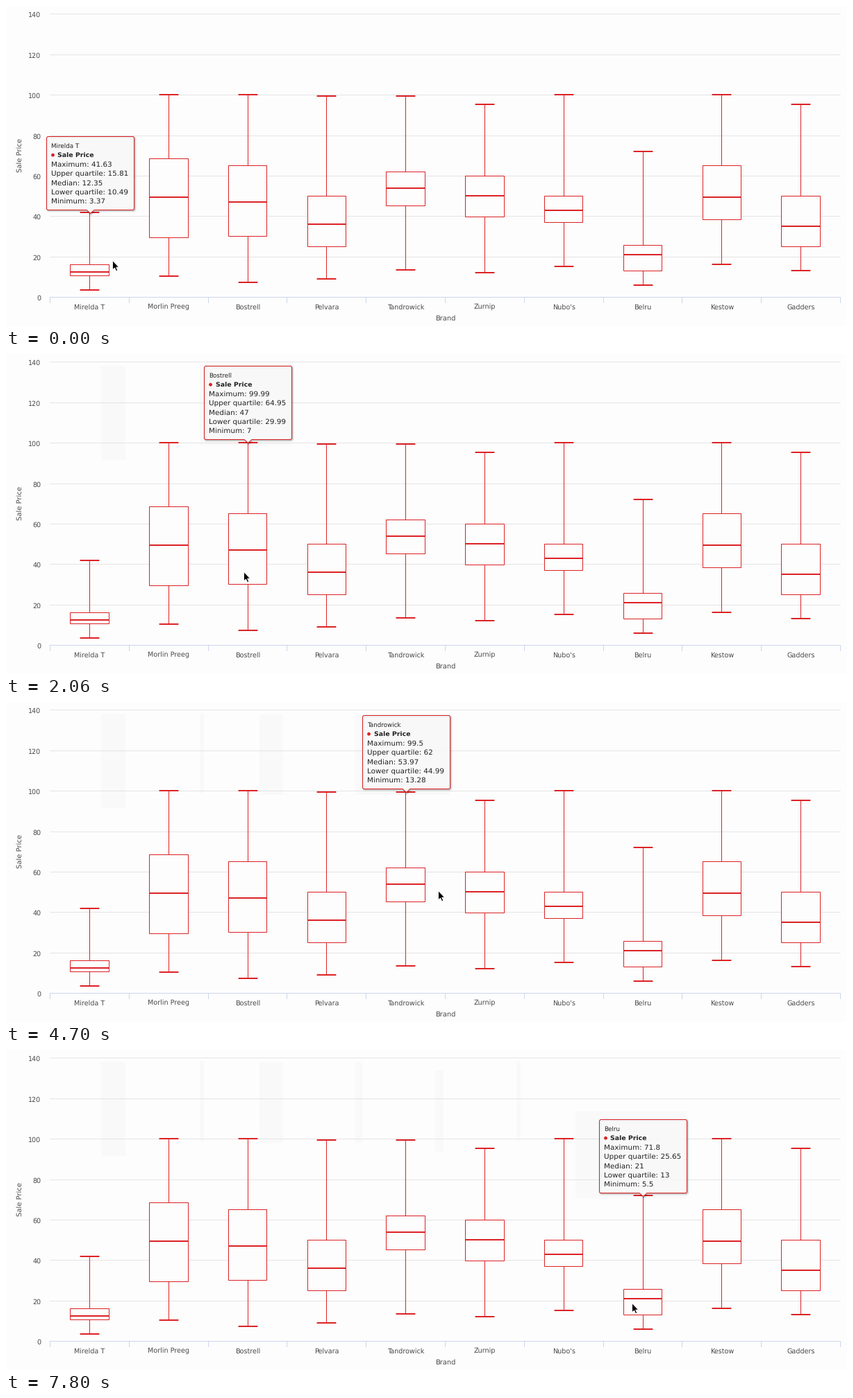
A matplotlib script that plays this animation: 1211x462 px, repeating every 8 s.

```python
import numpy as np
import matplotlib.pyplot as plt
from matplotlib.animation import FuncAnimation
from matplotlib.collections import LineCollection
from matplotlib.patches import Circle, PathPatch, Polygon, Rectangle
from matplotlib.path import Path

plt.rcParams["font.family"] = "DejaVu Sans"
plt.rcParams["text.hinting"] = "none"

W, H, DPI = 1211, 462, 64
PT = 72 / DPI  # points per pixel

BG = "#fdfdfd"
RED = "#dc2225"
GRID = "#e4e4e4"
AXIS = "#ccd6eb"
LABEL = "#4a4a4a"
INK = "#222222"
TRAIL = "#f9f9f9"

LEFT, SLOT = 63.05, 113.8
BASE, UNIT = 420, 408 / 140  # pixel row of price 0, pixels per price unit

# name, then minimum, lower quartile, median, upper quartile, maximum
BRANDS = [
    ("Mirelda T", 3.37, 10.49, 12.35, 15.81, 41.63),
    ("Morlin Preeg", 10, 29.27, 49.5, 68.32, 99.99),
    ("Bostrell", 7, 29.99, 47, 64.95, 99.99),
    ("Pelvara", 8.66, 25, 36, 49.99, 99.5),
    ("Tandrowick", 13.28, 44.99, 53.97, 62, 99.5),
    ("Zurnip", 12, 39.5, 49.99, 60, 95.2),
    ("Nubo's", 14.99, 36.99, 42.99, 49.99, 99.99),
    ("Belru", 5.5, 13, 21, 25.65, 71.8),
    ("Kestow", 16, 38.2, 49.5, 64.95, 99.99),
    ("Gadders", 13, 25, 35, 49.99, 95.2),
]

INTERVAL, FRAMES = 50, 160
STEP, LAST_STEP = 147.1, 53  # the screen refreshes in steps of STEP ms

# Moment (ms) at which the tooltip leaves for each brand
STARTS = [-9999, 346, 1676, 2830, 4073, 4801, 6378, 7402]
# Faint strip left behind by each move: left, top, bottom
TRAILS = [(137, 17, 153), (279, 16, 132), (365, 18, 134), (503, 18, 134),
          (618, 30, 147), (735, 16, 132), (820, 88, 214)]
# Pointer path: step, x, y
POINTER = np.array([
    (0, 153, 367), (2.4, 178, 348), (5, 220, 325), (8, 253, 320),
    (11.3, 291, 317), (14, 342, 314), (17, 372, 320), (19.3, 405, 327),
    (21, 462, 336), (23, 462, 336), (27.7, 519, 306), (32, 622, 272),
    (39, 694, 284), (43.4, 746, 293), (46, 797, 301), (47.5, 813, 309),
    (50.4, 860, 337), (53, 901, 365),
])


def center(i):
    return LEFT + SLOT * (i + 0.5)


def price_y(value):
    return BASE - UNIT * value


def rows(i):
    _, low, q1, med, q3, high = BRANDS[i]
    return [f"Maximum: {high:g}", f"Upper quartile: {q3:g}", f"Median: {med:g}",
            f"Lower quartile: {q1:g}", f"Minimum: {low:g}"]


def tip_width(i):
    longest = max(len(row) for row in rows(i))
    return 126 - 6.6 * (21 - longest)


def tip_rest(i):
    return center(i) + 0.9 - tip_width(i) / 2, price_y(BRANDS[i][5]) - 110.65


def tip_state(ms):
    """Active brand, elapsed easing ticks and tooltip corner."""
    i = max(j for j, start in enumerate(STARTS) if start <= ms)
    ticks = (ms - STARTS[i]) / 31.5
    x, y = tip_rest(i)
    if i and ticks < 12:
        px, py = tip_rest(i - 1)
        x += (px - x) * (2 / 3) ** ticks
        y += (py - y) * 0.5 ** ticks
    return i, ticks, round(x) + 0.5, np.floor(y) + 0.5


def callout(x, y, w, h=106, r=2.5):
    """Rounded box with a small arrow under its middle."""
    x2, y2, m = x + w, y + h, x + w / 2
    M, L, Q = Path.MOVETO, Path.LINETO, Path.CURVE3
    parts = [
        (M, x + r, y), (L, x2 - r, y), (Q, x2, y), (Q, x2, y + r),
        (L, x2, y2 - r), (Q, x2, y2), (Q, x2 - r, y2),
        (L, m + 5.5, y2), (L, m, y2 + 5), (L, m - 5.5, y2),
        (L, x + r, y2), (Q, x, y2), (Q, x, y2 - r),
        (L, x, y + r), (Q, x, y), (Q, x + r, y),
        (Path.CLOSEPOLY, x + r, y),
    ]
    return Path([p[1:] for p in parts], [p[0] for p in parts])


fig = plt.figure(figsize=(W / DPI, H / DPI), dpi=DPI, facecolor=BG)
ax = fig.add_axes([0, 0, 1, 1])
ax.set_xlim(0, W)
ax.set_ylim(H, 0)
ax.axis("off")


def text(x, y, s, px, color, z=3, **kw):
    return ax.text(x, y, s, fontsize=px * PT, color=color, va="baseline",
                   zorder=z, **kw)


def lines(segments, color, px, z):
    # Positions are already on the pixel grid, so snapping stays off.
    strokes = LineCollection(segments, colors=color, capstyle="butt",
                             linewidths=px * PT, zorder=z)
    strokes.set_snap(False)
    ax.add_collection(strokes)


def hline(x1, x2, y):
    return [(x1, y), (x2, y)]


def vline(x, y1, y2):
    return [(x, y1), (x, y2)]


def draw_axes():
    values = range(0, 141, 20)
    ys = [np.floor(420.75 - 409 / 140 * v) + 0.5 for v in values]
    edges = [round(LEFT + SLOT * i) + 0.5 for i in range(11)]
    lines([hline(edges[0], edges[-1], y) for y in ys[1:]], GRID, 1, 1)
    ticks = [vline(x, ys[0], 429) for x in edges]
    lines([hline(edges[0] - 0.5, edges[-1] + 0.5, ys[0])] + ticks, AXIS, 1, 1.5)
    for v, y in zip(values, ys):
        text(50.5, y + 4.2, str(v), 9.5, LABEL, ha="right")
    for i, brand in enumerate(BRANDS):
        text(center(i) + 0.6, 437.4, brand[0], 9.6, LABEL, ha="center")
    text(632.5, 454, "Brand", 9.9, LABEL, ha="center")
    text(23, 215.5, "Sale Price", 10, LABEL, ha="center", rotation=90,
         rotation_mode="anchor")


def draw_boxes():
    thin, thick = [], []
    for i, (_, *values) in enumerate(BRANDS):
        c = round(center(i)) + 0.5
        x1, x2 = (round(center(i) + side) + 0.5 for side in (-27.75, 27.75))
        low, q1, _, q3, high = (np.floor(price_y(v)) for v in values)
        med = round(price_y(values[2]))
        thin += [vline(c, high, q3), vline(c, q1 + 1, low)]
        thick += [hline(c - 13.9, c + 13.9, high), hline(c - 13.9, c + 13.9, low),
                  hline(x1, x2, med)]
        ax.add_patch(Rectangle((x1, q3 + 0.5), x2 - x1, q1 - q3, facecolor=BG,
                               edgecolor=RED, linewidth=PT, zorder=2,
                               joinstyle="miter", snap=False))
    lines(thin, RED, 1, 2)
    lines(thick, RED, 2, 2.5)


draw_axes()
draw_boxes()

trails = [ax.add_patch(Rectangle((x, top), 1, bottom - top, facecolor=TRAIL,
                                 linewidth=0, zorder=0.5))
          for x, top, bottom in TRAILS]

blank = callout(0, 0, 126)
shadows = [ax.add_patch(PathPatch(blank, fill=False, zorder=5, snap=False,
                                  edgecolor=(0, 0, 0, 0.05 * n),
                                  linewidth=(6.2 - 1.8 * n) * PT))
           for n in (1, 2, 3)]
tip = ax.add_patch(PathPatch(blank, facecolor=(0.973, 0.973, 0.973, 0.87),
                             edgecolor=RED, linewidth=PT, zorder=6, snap=False))
bullet = ax.add_patch(Circle((0, 0), 2.4, facecolor=RED, linewidth=0, zorder=7))
header = text(0, 0, "", 8.8, INK, 7)
series = text(0, 0, "Sale Price", 9.4, INK, 7, weight="bold")
stats = [text(0, 0, "", 10.4, INK, 7) for _ in range(5)]

ARROW = np.array([(0, 0), (0, 13.4), (3, 10.6), (5.1, 15.2), (7.3, 14.3),
                  (5.2, 9.7), (9.2, 9.7)])
pointer = ax.add_patch(Polygon(ARROW, closed=True, facecolor="black",
                               edgecolor="white", linewidth=0.9 * PT,
                               joinstyle="miter", zorder=9))


def place_tip(i, x, y):
    w = tip_width(i)
    tip.set_path(callout(x, y, w))
    for shadow in shadows:
        shadow.set_path(callout(x + 1, y + 1, w))
    header.set_text(BRANDS[i][0])
    for label, s in zip(stats, rows(i)):
        label.set_text(s)
    for n, label in enumerate([header, series] + stats):
        indent = 16 if label is series else 6.5
        label.set_position((x + indent, y + 16.4 + 13.38 * n))
    bullet.center = (x + 9, y + 26.7)


def place_trails(i, ticks):
    for j, (patch, (left, _, _)) in enumerate(zip(trails, TRAILS), start=1):
        rest = tip_rest(j)[0]
        current = j == i
        patch.set_visible(j < i or (current and ticks > 4))
        patch.set_width(rest + (tip_width(j) if current else 0) - left)


def update(frame):
    step = min(int((frame * INTERVAL + 45) / STEP), LAST_STEP)
    i, ticks, x, y = tip_state(step * STEP)
    place_tip(i, x, y)
    place_trails(i, ticks)
    px, py = (np.interp(step, POINTER[:, 0], POINTER[:, c]) for c in (1, 2))
    pointer.set_xy(ARROW + (px + 0.5, py + 0.5))


anim = FuncAnimation(fig, update, frames=FRAMES, interval=INTERVAL,
                     repeat=True, repeat_delay=0)
plt.show()
```
